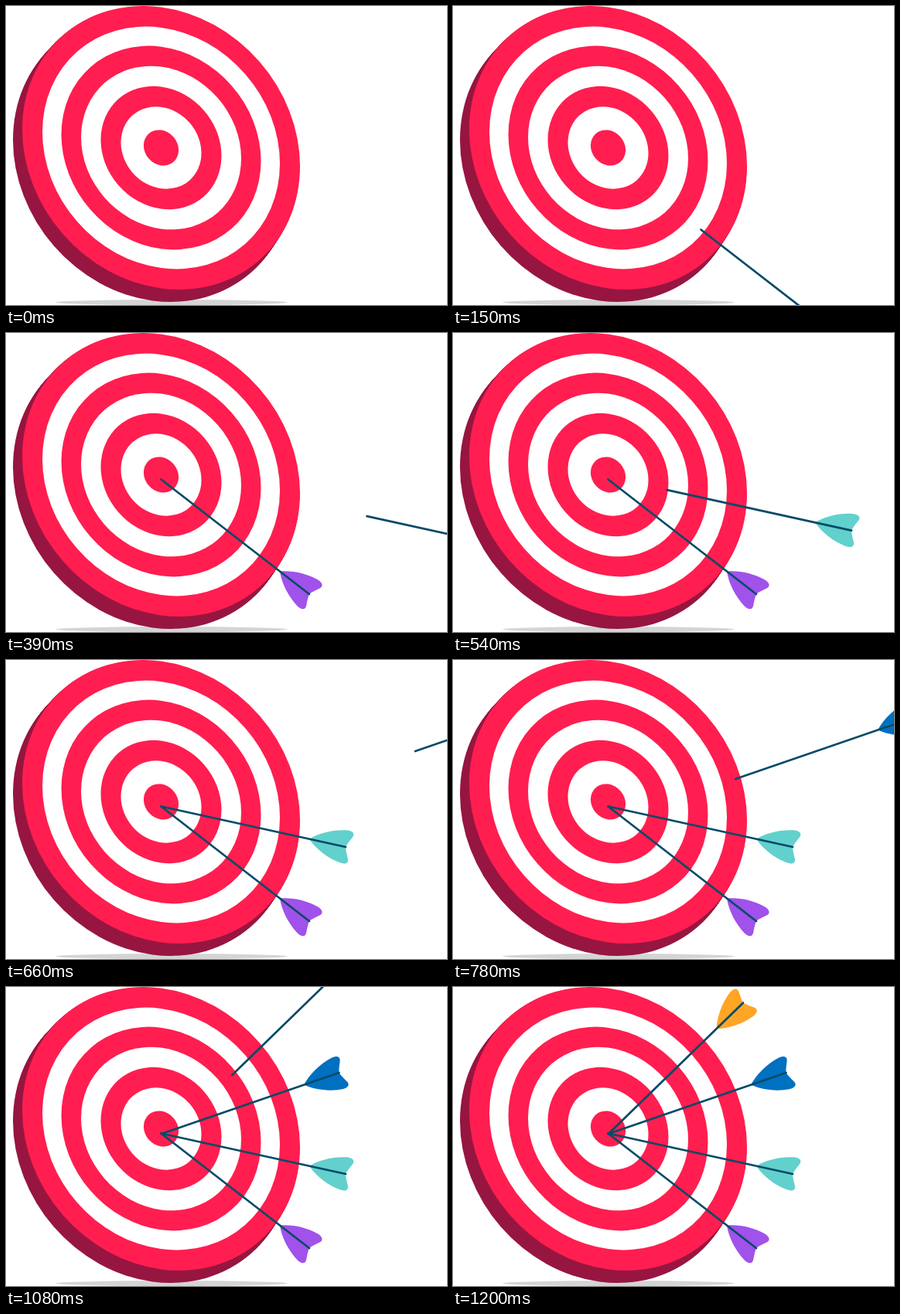
Write an HTML page with a canvas that moves like this. It is 570 px wide and 387 px high and loops after 1.6 s.

```html
<!DOCTYPE html>
<html lang="en">
<head>
<meta charset="utf-8">
<title>Arrows hitting a target</title>
<style>
  html, body { margin: 0; width: 100%; height: 100%; overflow: hidden; background: #fff; }
  canvas { display: block; width: 570px; height: 387px; }
</style>
</head>
<body>
<canvas id="stage" width="570" height="387"></canvas>
<script>
const ctx = document.getElementById('stage').getContext('2d');
const LOOP = 1600, STEP = 30, FLIGHT_STEPS = 10;
const RED = '#ff1e4f', DARK = '#971641', SHAFT = '#044a67';
const SKEW = 0.13;
const CENTER = { x: 200.5, y: 183.5 };
const RINGS = [179.5, 153.5, 129, 103.5, 78, 52, 22.6];
const HEIGHT_RATIO = 183.5 / 179.5;

// end: nock of the landed arrow; from: offset at which the flight starts
const ARROWS = [
  { color: '#a052ea', tip: [200.5, 189.5], end: [392, 338], from: [240, 200] },
  { color: '#62d0cd', tip: [200.5, 189.5], end: [439, 242], from: [380, 68] },
  { color: '#0070c0', tip: [201, 190], end: [430.5, 111], from: [410, -90] },
  { color: '#ffa526', tip: [201, 190], end: [375, 20.5], from: [228, -190] }
];

function fillEllipse(x, y, halfWidth, halfHeight, skew, color) {
  ctx.save();
  ctx.translate(x, y);
  ctx.transform(halfWidth, skew * halfHeight, 0, halfHeight * Math.sqrt(1 - skew * skew), 0, 0);
  ctx.beginPath();
  ctx.arc(0, 0, 1, 0, Math.PI * 2);
  ctx.restore();
  ctx.fillStyle = color;
  ctx.fill();
}

function drawTarget() {
  fillEllipse(214, 383.6, 150, 3.5, 0, '#d4d4d4');
  for (let i = 16; i > 0; i--) {
    const k = i / 16;
    fillEllipse(CENTER.x - 11 * k, CENTER.y + 14 * k, 179.5 + k, 183.5 + 2 * k, SKEW, DARK);
  }
  RINGS.forEach((r, i) =>
    fillEllipse(CENTER.x, CENTER.y, r, r * HEIGHT_RATIO, SKEW, i % 2 ? '#fff' : RED));
}

function drawArrow({ color, tip, end, from }, remaining) {
  const dx = end[0] - tip[0], dy = end[1] - tip[1];
  ctx.save();
  ctx.translate(end[0] + from[0] * remaining, end[1] + from[1] * remaining);
  ctx.rotate(Math.atan2(dy, dx));

  ctx.fillStyle = color;
  ctx.beginPath();
  for (const side of [-1, 1]) {
    ctx.moveTo(-48, 0);
    ctx.bezierCurveTo(-38, 10 * side, -20, 19 * side, -3, 21.5 * side);
    ctx.bezierCurveTo(5, 22.5 * side, 9, 19 * side, 5.5, 13 * side);
    ctx.bezierCurveTo(3, 8 * side, 1, 4 * side, 0, 0);
    ctx.closePath();
  }
  ctx.fill();

  ctx.strokeStyle = SHAFT;
  ctx.lineWidth = 2.7;
  ctx.lineCap = 'round';
  ctx.beginPath();
  ctx.moveTo(-Math.hypot(dx, dy), 0);
  ctx.lineTo(0, 0);
  ctx.stroke();
  ctx.restore();
}

function render(now) {
  const step = Math.floor((now % LOOP) / STEP);
  ctx.fillStyle = '#fff';
  ctx.fillRect(0, 0, 570, 387);
  drawTarget();
  ARROWS.forEach((arrow, i) => {
    const progress = (step - i * FLIGHT_STEPS) / FLIGHT_STEPS;
    if (progress > 0) drawArrow(arrow, 1 - Math.min(progress, 1));
  });
}

const start = performance.now();
function tick() {
  render(performance.now() - start);
  requestAnimationFrame(tick);
}
tick();
</script>
</body>
</html>
```
